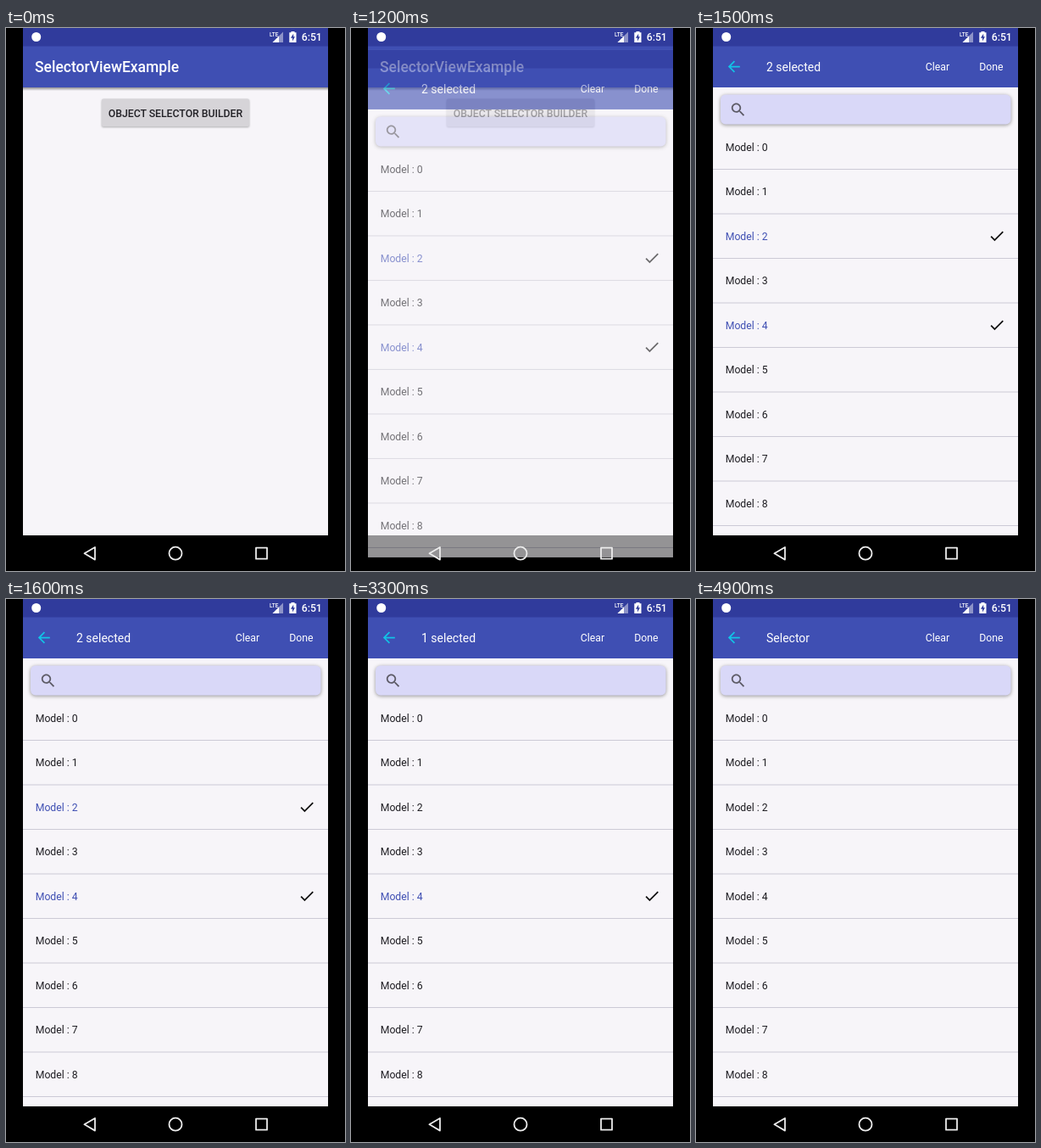
These frames come from a looping animation (400 by 640 pixels, 5 s). An HTML page:

```html
<!DOCTYPE html>
<html lang="en">
<head>
<meta charset="utf-8">
<title>Selector view</title>
<style>
  html, body { margin: 0; width: 100%; height: 100%; overflow: hidden; background: #000; }
  svg { display: block; width: 400px; height: 640px; font: 12.25px Roboto, sans-serif; }
  .bold { font-weight: 500; }
  .list { fill: #1d1c21; }
  .picked { fill: #3f4fb3; }
  .nav { fill: none; stroke: #ececec; stroke-width: 1.8; stroke-linejoin: round; }
  .button { filter: drop-shadow(0 1px 1px rgba(0, 0, 0, .3)); }
  .card { filter: drop-shadow(0 1px 2px rgba(0, 0, 0, .4)); }
</style>
</head>
<body>
<svg viewBox="0 0 400 640">
  <defs>
    <linearGradient id="shade" x2="0" y2="1">
      <stop stop-color="#000" stop-opacity=".42"/>
      <stop offset="1" stop-color="#000" stop-opacity="0"/>
    </linearGradient>
    <g id="page">
      <rect x="20" width="360" height="598" fill="#f7f5f9"/>
      <rect x="20" width="360" height="70" fill="#3f4fb3"/>
      <rect x="20" width="360" height="21.5" fill="#303b9c"/>
    </g>
    <path id="tick" d="M9 16.17L4.83 12l-1.42 1.41L9 19 21 7l-1.41-1.41z"/>
  </defs>
  <rect width="400" height="640"/>

  <use href="#page"/>
  <rect x="20" y="70" width="360" height="4" fill="url(#shade)"/>
  <text class="bold" x="34" y="52" font-size="17.5" fill="#fff">SelectorViewExample</text>
  <rect class="button" x="113" y="83.5" width="174" height="32.5" rx="1.8" fill="#d6d4d8"/>
  <text class="bold" x="200" y="104.5" text-anchor="middle" fill="#222126">OBJECT SELECTOR BUILDER</text>

  <g id="picker">
    <use href="#page"/>
    <path transform="translate(34.3 35) scale(.875)" fill="#12c3e6"
      d="M20 11H7.83l5.59-5.59L12 4l-8 8 8 8 1.41-1.41L7.83 13H20v-2z"/>
    <text id="title" x="83" y="51" font-size="14" fill="#fff"></text>
    <g fill="#fff" text-anchor="middle">
      <text x="285" y="50.3">Clear</text>
      <text x="348.3" y="50.3">Done</text>
    </g>
    <rect class="card" x="29" y="78.5" width="342.5" height="35" rx="6" fill="#d9d8f8"/>
    <path transform="translate(39.2 85.8) scale(.875)" fill="#5d5b66"
      d="M15.5 14h-.79l-.28-.27C15.41 12.59 16 11.11 16 9.5 16 5.91 13.09 3 9.5 3S3 5.91 3 9.5 5.91 16 9.5 16c1.61 0 3.09-.59 4.23-1.57l.27.28v.79l5 4.99L20.49 19l-4.99-5zm-6 0C7.01 14 5 11.99 5 9.5S7.01 5 9.5 5 14 7.01 14 9.5 11.99 14 9.5 14z"/>
    <g id="rows" class="list"></g>
  </g>

  <g fill="#fff">
    <circle cx="35.7" cy="10.5" r="5.5"/>
    <path d="M327 4.5V17H314.5z" opacity=".45"/>
    <path d="M322 9.5V17H314.5z"/>
    <text class="bold" x="311" y="9.7" font-size="6.5" font-stretch="75%">LTE</text>
    <path d="M336.5 4h4v1.3h2V17h-8.200V5.300h2.200z"/>
    <path d="M339.200 6.800L335.900 11.800h2.100v3.700L341 10.300h-1.800z" fill="#303b9c"/>
    <text class="bold" x="348.700" y="15.300">6:51</text>
  </g>
  <g class="nav">
    <path d="M92.500 619.300L105 612V626.600z"/>
    <circle cx="200" cy="619.200" r="7.500"/>
    <rect x="295" y="612.700" width="13" height="13"/>
  </g>
</svg>
<script>
const $ = id => document.getElementById(id);
const clamp = v => Math.min(1, Math.max(0, v));
const LOOP = 5000, STEP = 100;

// Rows that start picked, with the time each one is cleared.
const cleared = { 2: 2800, 4: 4500 };

let rows = '';
for (let i = 0; i < 9; i++) {
  const y = 140.3 + 52.5 * i;
  const label = `<text x="34.700" y="${y + 4.4}">Model : ${i}</text>`;
  rows += `<g id="plain${i}">${label}</g>`;
  if (cleared[i]) {
    rows += `<g id="picked${i}"><g class="picked">${label}</g>
      <use href="#tick" transform="translate(344.500 ${y - 5.700 - 5}) scale(.875)" fill="#111"/></g>`;
  }
  rows += `<rect x="20" y="${y + 25.7}" width="360" height="1" fill="#cccad6"/>`;
}
$('rows').innerHTML = rows;

function draw(t) {
  const lift = 48 * (1 - clamp((t - 1146) / 204)) ** 2;
  $('picker').setAttribute('transform', `translate(0 ${lift})`);
  $('picker').setAttribute('opacity', clamp((t - 1146) / 90));

  let count = 0;
  for (const i in cleared) {
    const fade = clamp((t - cleared[i] + 50) / 250);
    $('plain' + i).setAttribute('opacity', fade);
    $('picked' + i).setAttribute('opacity', 1 - fade);
    if (t < cleared[i]) count++;
  }
  $('title').textContent = count ? `${count} selected` : 'Selector';
}

function tick() {
  const t = performance.now() % LOOP;
  draw(Math.floor(t / STEP) * STEP);
  requestAnimationFrame(tick);
}
tick();
</script>
</body>
</html>
```
